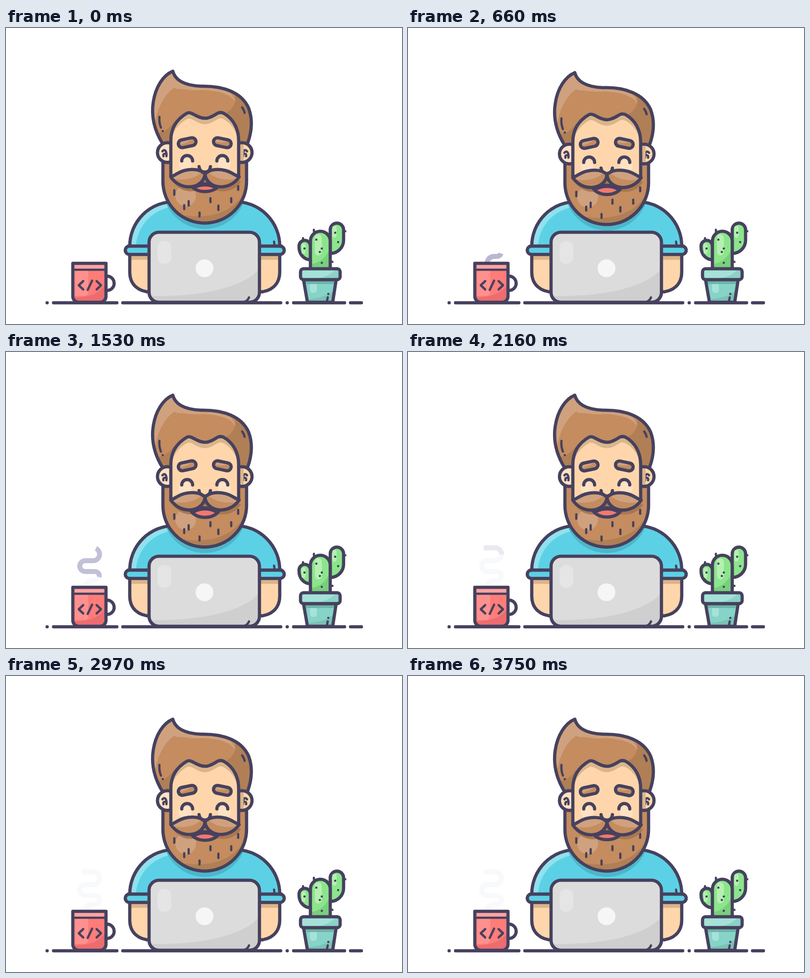
These frames come from a looping animation (800 px wide and 600 px high, 3.78 s). An HTML page:

```html
<!DOCTYPE html>
<html lang="en">
<head>
<meta charset="utf-8">
<title>Smiling developer</title>
<style>
  html, body { margin: 0; width: 100%; height: 100%; overflow: hidden; background: #fff; }
  svg { display: block; width: 800px; height: 600px; }
  .line { stroke: #46415e; stroke-width: 6.5; stroke-linecap: round; stroke-linejoin: round; }
  .thin { stroke-width: 4.5; }
  .open { fill: none; }
  .hair { fill: #c48c5f; }
  .hairLight { fill: #cfa17e; }
  .hairDark { fill: #b07f56; }
  .skin { fill: #ffd6ab; }
  .skinDark { fill: #dab58b; }
  .skinLight { fill: #ffe1c3; }
  .shirt { fill: #5cd1e6; }
  .dots { fill: #46415e; }
</style>
</head>
<body>
<svg viewBox="0 0 800 600" fill="none">
  <defs>
    <path id="shirt" d="M250 444V442A90 90 0 0 1 340 352H463A90 90 0 0 1 553 442V444Z"/>
    <path id="beard" d="M317 262V311A84.5 84.5 0 0 0 486 311V262Z"/>
    <path id="hair" d="M316 234C299 206 293 179 297.500 150C302 120 317 96 337 87.500C341 104 358 117 395 118C440 117 476 131 490 162C499 186 496 212 488 234Z"/>
    <path id="face" d="M333 300V228C333 205 343 186 365 173Q369 170.500 375 173C385 178 392 183 402 183C412 183 420 177 428 172.500Q434 170 440 173C459 184 470 204 470 228V300"/>
    <path id="lobe" d="M402 296C393 286 376 285 360 289C349 292 342 298 333 302C343 317 358 322 370 322C388 322 401 310 402 296Z"/>
    <path id="arm" d="M250 456V495C250 520 268 535 292 535H300V456Z"/>
    <path id="cup" d="M135 477H202V544A12 12 0 0 1 190 556H147A12 12 0 0 1 135 544Z"/>
    <path id="stem" d="M615 488V432A20 20 0 0 1 655 432V488"/>
    <path id="pot" d="M601 510L609 556H660L667 510Z"/>
    <rect id="laptop" x="289" y="414" width="223" height="142" rx="20"/>
    <clipPath id="inShirt"><use href="#shirt"/></clipPath>
    <clipPath id="inBeard"><use href="#beard"/></clipPath>
    <clipPath id="inHair"><use href="#hair"/></clipPath>
    <clipPath id="inFace"><use href="#face"/></clipPath>
    <clipPath id="inLobe"><use href="#lobe"/></clipPath>
    <clipPath id="inArm"><use href="#arm"/></clipPath>
    <clipPath id="inCup"><use href="#cup"/></clipPath>
    <clipPath id="inStem"><use href="#stem"/></clipPath>
    <clipPath id="inPot"><use href="#pot"/></clipPath>
    <clipPath id="inLaptop"><use href="#laptop"/></clipPath>
    <clipPath id="inMouth"><path class="mouth"/></clipPath>

    <g id="sleeve">
      <use href="#arm" class="skin"/>
      <path class="skinDark" clip-path="url(#inArm)" d="M240 456H300V470H240Z"/>
      <use href="#arm" class="line open"/>
      <rect class="shirt line" x="241" y="442" width="62" height="17" rx="8.500"/>
    </g>
    <g id="ear">
      <circle class="line" cx="326" cy="252.500" r="20"/>
      <path class="line thin open" d="M316 250Q320 245 323 250Q325 255 324 260M318 260Q317 255 321 255"/>
    </g>
    <g id="whisker">
      <use href="#lobe" class="hair"/>
      <path class="hairLight" clip-path="url(#inLobe)" d="M333 304C355 311 385 306 397 290L380 280L340 285Z"/>
      <use href="#lobe" class="line open"/>
    </g>
    <g id="brow">
      <rect class="hair" x="-18" y="-8" width="36" height="16" rx="8"/>
      <path class="hairLight" d="M-14 1V-3Q-13 -5 -10 -5H10Q2 1 -14 1Z"/>
      <rect class="line open" x="-18" y="-8" width="36" height="16" rx="8"/>
    </g>
    <path id="smoke" pathLength="100" d="M159 478Q162 463 174 463H179.500A9 9 0 0 0 179.500 445H160A11 11 0 0 1 160 423H176A13 13 0 0 0 176 397H153"/>
  </defs>

  <!-- steam -->
  <g stroke-width="10">
    <use id="trace" href="#smoke" stroke="#f8f9fb"/>
    <use id="steam" href="#smoke" stroke="#bab7d1"/>
  </g>

  <!-- mug -->
  <path class="line open" d="M204 503A14.500 14.500 0 0 1 204 532"/>
  <use href="#cup" fill="#ff7c79"/>
  <g clip-path="url(#inCup)">
    <path fill="#ffa3a1" d="M135 477H202V490H135Z"/>
    <path fill="#ff908d" d="M139 490H166V535Q166 543 158 543H139Z"/>
    <path fill="#ec6d70" d="M202 514C196 535 172 546 135 546V560H205Z"/>
  </g>
  <path class="line thin" d="M135 490H202"/>
  <use href="#cup" class="line open"/>
  <path class="line thin open" d="M156 513L147 521.500L156 530M174 512L165 531M183 513L192 521.500L183 530"/>

  <!-- cactus -->
  <path class="line" fill="#8ce58c" d="M655 409A13.500 13.500 0 0 1 682 409V430C682 445 670 457 655 457Z"/>
  <path class="line" fill="#8ce58c" d="M615 470C601 469 592 458 592 444V442A11.500 11.500 0 0 1 615 442Z"/>
  <use href="#stem" fill="#8ce58c"/>
  <path fill="#78cf7c" clip-path="url(#inStem)" d="M656 440Q647 474 615 479V490H656Z"/>
  <use href="#stem" class="line open"/>
  <g fill="#b5f0b1">
    <rect x="624" y="418" width="14" height="43" rx="7"/>
    <rect x="659" y="401" width="9" height="24" rx="4.500"/>
    <rect x="597" y="437" width="8" height="21" rx="4"/>
  </g>
  <path class="line thin" d="M622 409V412M600 426V429M685 412H685.500M659 474H659.500"/>
  <g class="dots">
    <circle cx="627" cy="429" r="2.300"/><circle cx="638" cy="447" r="2.300"/>
    <circle cx="634" cy="454" r="2.300"/><circle cx="638" cy="476" r="2.300"/>
    <circle cx="603" cy="447" r="2.300"/><circle cx="665" cy="415" r="2.300"/>
    <circle cx="671" cy="434" r="2.300"/>
  </g>
  <use href="#pot" fill="#86d3c7"/>
  <g clip-path="url(#inPot)">
    <path fill="#7bc1b6" d="M667 525Q655 547 605 550V560H670Z"/>
    <path fill="#6db5aa" d="M598 510H670V519H598Z"/>
    <path fill="#a6e2d9" d="M614 519H628V531Q628 537 621 537Q615 537 614 531Z"/>
  </g>
  <use href="#pot" class="line open"/>
  <rect fill="#a4e1d8" x="595" y="488" width="80" height="22" rx="6"/>
  <path fill="#8dd2c7" d="M675 494V504Q675 510 669 510H604Q655 508 666 488Q675 488 675 494Z"/>
  <rect class="line open" x="595" y="488" width="80" height="22" rx="6"/>
  <path class="line thin" d="M650 546L648.500 553M651 539H651.200"/>

  <!-- body -->
  <use href="#sleeve"/>
  <use href="#sleeve" transform="translate(803) scale(-1 1)"/>
  <use href="#shirt" fill="#90e1ee"/>
  <g clip-path="url(#inShirt)">
    <path class="shirt" d="M262 446C264 402 294 367 342 361L345 350H560V446Z"/>
    <use id="shade" href="#beard" fill="#4eb6c9"/>
  </g>
  <path class="line open" d="M250 442A90 90 0 0 1 340 352H463A90 90 0 0 1 553 442"/>
  <path class="line" d="M247 442H300M503 442H556"/>
  <path class="line thin" d="M541.500 433L542.500 440"/>

  <!-- head -->
  <g id="head">
    <use href="#hair" class="hair"/>
    <g clip-path="url(#inHair)">
      <path class="hairLight" d="M300 208C302 168 318 136 340 121C355 131 378 125 402 126C440 128 462 140 463 154Q461 168 445 171C480 180 470 110 400 112L337 80L285 150Z"/>
      <path class="hair" d="M330 128C350 118 360 128 402 127C436 128 458 139 460 153Q462 172 440 180H330Z"/>
      <path class="hairDark" d="M463 136Q466 160 445 172L470 236H510V150ZM305 212Q322 214 340 190V236H312Z"/>
    </g>
    <use href="#hair" class="line open"/>
    <path class="line thin open" d="M310 180Q309 192 313 202M316.500 209H316.700M477 161Q481 166 482 172"/>

    <use href="#beard" class="hair"/>
    <g clip-path="url(#inBeard)">
      <path class="hairDark" d="M486 318C476 366 416 394 345 377L370 400H490Z"/>
      <circle class="hairLight" cx="363" cy="340" r="21"/>
    </g>
    <use href="#beard" class="line open"/>
    <path class="line thin" d="M340 329V338M369 351V360M360 359V367M413 345V353M391 374V382M429 360V369M455 345V353M469 320V328"/>

    <use href="#ear" class="skinLight"/>
    <use href="#ear" class="skin" transform="translate(803) scale(-1 1)"/>
    <path class="skinDark" d="M470 236H480V269H470Z"/>
    <use href="#face" class="skinDark"/>
    <g clip-path="url(#inFace)">
      <use href="#face" class="skin" transform="translate(0 12)"/>
      <circle class="skinLight" cx="362" cy="276" r="13"/>
      <circle class="skinLight" cx="441" cy="276" r="13"/>
    </g>
    <use href="#face" class="line open"/>
    <path class="line open" d="M355 269.500A11 11 0 0 1 377 269.500M426 269.500A11 11 0 0 1 448 269.500"/>

    <g class="lift">
      <use href="#brow" transform="translate(366 232.500) rotate(-12)"/>
      <use href="#brow" transform="translate(437 232.500) rotate(12)"/>
    </g>

    <g class="lift" fill="#a9774f" clip-path="url(#inBeard)">
      <use href="#lobe" transform="translate(4 9)"/>
      <use href="#lobe" transform="translate(808 9) scale(-1 1)"/>
    </g>
    <path class="mouth" fill="#8c4a4c"/>
    <g clip-path="url(#inMouth)"><ellipse class="line thin" fill="#f2786f" cx="402" cy="333" rx="27" ry="14"/></g>
    <path class="mouth line open"/>
    <path class="line skin" d="M390 281Q391 292 402 292Q412 292 413 281"/>
    <g class="lift">
      <use href="#whisker"/>
      <use href="#whisker" transform="translate(804) scale(-1 1)"/>
    </g>
  </g>

  <!-- laptop and desk -->
  <use href="#laptop" fill="#dcdcdc"/>
  <path fill="#cfcfcf" clip-path="url(#inLaptop)" d="M285 543C390 546 485 527 515 484V560H285Z"/>
  <rect fill="#e5e5e5" x="306" y="432" width="28" height="46" rx="13"/>
  <use href="#laptop" class="line open"/>
  <path class="line thin open" d="M482 555Q488 553 491 546"/>
  <circle fill="#f6f6f6" cx="401" cy="487" r="18"/>
  <path class="line" d="M83 557H83.200M96 557H224M236 557H555M568 557H568.200M581 557H684M696 557H718"/>
</svg>
<script>
  const LOOP = 3780, SMILE = 945, NOD = 1080;
  const $ = id => document.getElementById(id);
  const all = selector => document.querySelectorAll(selector);
  const clamp = x => Math.min(1, Math.max(0, x));
  const move = (el, y) => el.setAttribute('transform', `translate(0 ${y})`);

  // Shows the part of the steam path between two fractions of its length.
  function trim(el, from, to) {
    const length = 100 * Math.max(0, to - from);
    el.style.strokeDasharray = `${length} 300`;
    el.style.strokeDashoffset = -100 * from;
    el.style.visibility = length ? 'visible' : 'hidden';
  }

  function draw(t) {
    const nod = t < NOD ? 3.3 * Math.sin(Math.PI * t / NOD) ** 2 : 0;
    move($('head'), nod);
    move($('shade'), nod + 12);

    const smile = Math.abs(Math.sin(Math.PI * t / SMILE)) ** 1.2;
    all('.lift').forEach(el => move(el, -2 * smile));
    const bottom = 331.5 + 4 * smile;
    const control = 316 + (bottom - 316) / 0.75;
    const side = 373 - 2 * smile;
    all('.mouth').forEach(el => el.setAttribute('d',
      `M${side} 316C${side + 6} ${control} ${798 - side} ${control} ${804 - side} 316Z`));

    const rise = clamp((t - 240) / 1620);
    const front = (rise + (1 - Math.cos(Math.PI * rise)) / 2) / 2;
    const back = t < 2175 ? clamp((t - 1290) / 1130) : 1;
    trim($('steam'), back, front);
    trim($('trace'), 0, back);
    $('steam').style.opacity = 1 - 0.7 * clamp((t - 1200) / 960) ** 1.6;
  }

  const start = performance.now();
  function tick() {
    draw((performance.now() - start) % LOOP);
    requestAnimationFrame(tick);
  }
  tick();
</script>
</body>
</html>
```
